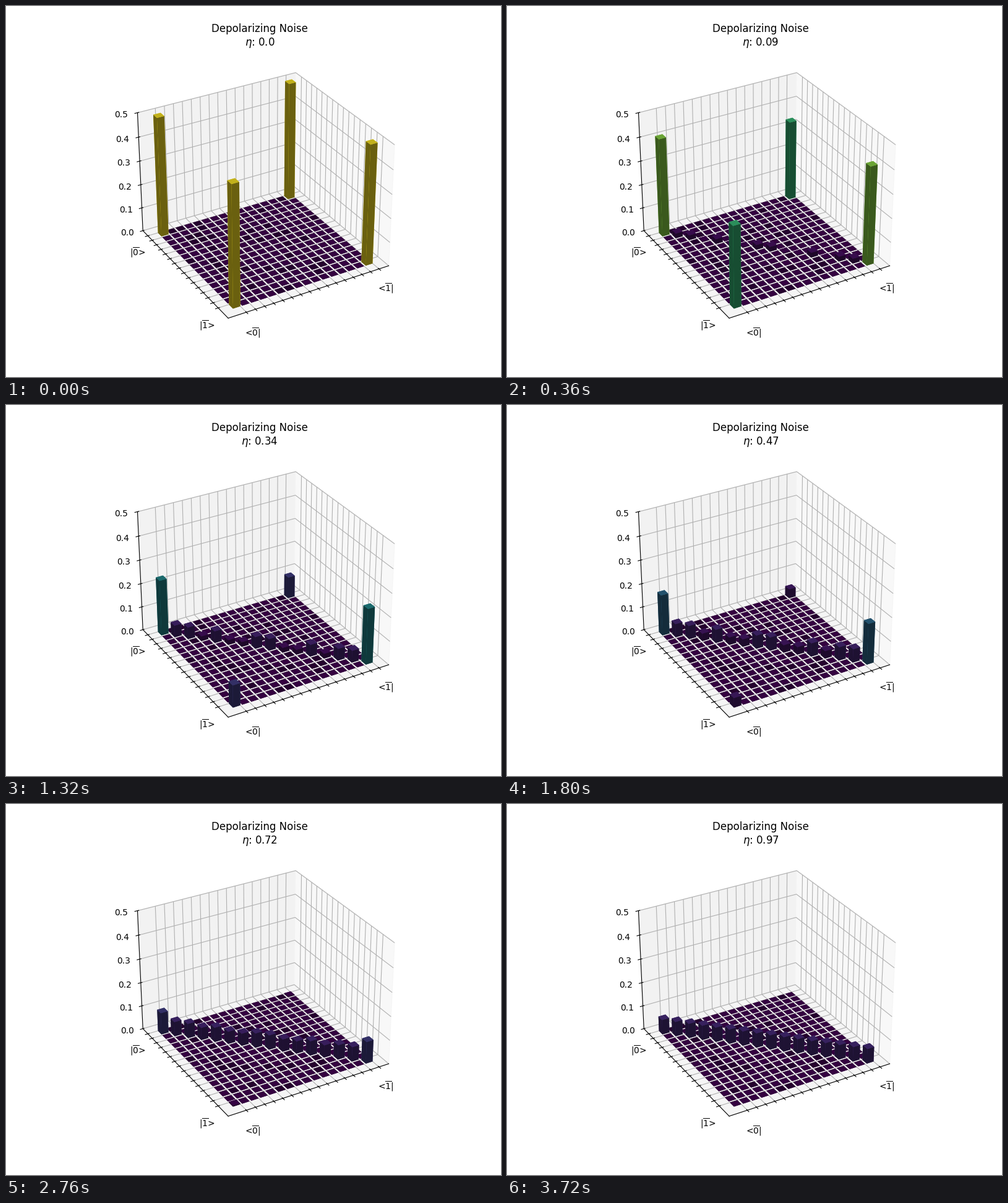
Write a matplotlib script that moves like this. It is 800x600 px and loops after 3840 ms.

```python
import matplotlib.pyplot as plt
import numpy as np
from matplotlib.animation import FuncAnimation

QUBITS = 4
SIZE = 2 ** QUBITS
STEPS = 32
WIDTH = 0.8
PEAK = 0.5

fig = plt.figure(figsize=(8, 6), dpi=100)
ax = fig.add_subplot(projection="3d")
ax.view_init(elev=30, azim=60)

cols, rows = (grid.ravel() for grid in np.meshgrid(np.arange(SIZE), np.arange(SIZE)))
ones = np.array([bin(i).count("1") for i in range(SIZE)])
bars = []


def density_matrix(eta):
    """GHZ state magnitudes after depolarizing every qubit by eta."""
    flip, keep = eta / 2, 1 - eta / 2
    zeros = QUBITS - ones
    rho = np.diag((keep ** zeros * flip ** ones + keep ** ones * flip ** zeros) / 2)
    rho[0, -1] = rho[-1, 0] = (1 - eta) ** QUBITS / 2
    return rho


def draw(step):
    eta = step / STEPS
    while bars:
        bars.pop().remove()
    heights = density_matrix(eta)[:, ::-1].ravel()
    colors = plt.cm.viridis(heights / PEAK)
    bars.append(ax.bar3d(cols, rows, 0, WIDTH, WIDTH, heights, color=colors))
    ax.set_title(f"Depolarizing Noise\n$\\eta$: {round(eta, 2)}")


def end_labels(first, last):
    return [first] + [""] * (SIZE - 2) + [last]


draw(0)
ax.set_zlim(0, PEAK)
ax.set_xticks(range(SIZE), end_labels(r"<$\overline{1}$|", r"<$\overline{0}$|"))
ax.set_yticks(range(SIZE), end_labels(r"|$\overline{0}$>", r"|$\overline{1}$>"))

anim = FuncAnimation(fig, draw, frames=STEPS, interval=120, init_func=lambda: None,
                     repeat=True, repeat_delay=0)
plt.show()
```
